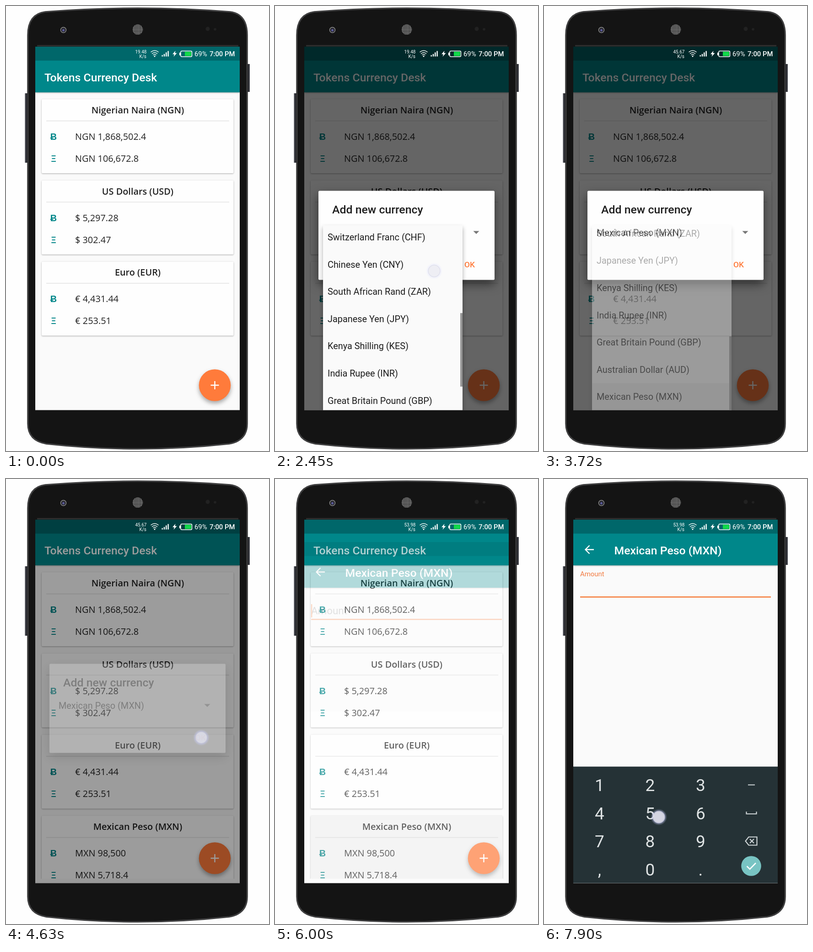
Recreate the animation shown at these times as an HTML page. Size 575x974 px, loop 8 s.

```html
<!DOCTYPE html>
<html lang="en">
<head>
<meta charset="utf-8">
<title>Currency app</title>
<style>
  html, body { margin: 0; width: 100%; height: 100%; overflow: hidden; background: #fefefe; }
  svg { display: block; width: 100vw; height: 100vh; font-family: Roboto, sans-serif; }
  .card { font: 19.87px "Open Sans", sans-serif; fill: #212121; }
  .head { font-weight: 600; text-anchor: middle; }
  .coin { font-weight: 600; text-anchor: middle; fill: #00878a; }
  .title { font-size: 24.8px; font-weight: 500; }
  .body { font-size: 19.87px; fill: #1c1c1c; }
  .key { font-size: 37px; fill: #dfe3e4; text-anchor: middle; }
  .low { filter: drop-shadow(0 1.5px 1.5px #0005); }
  .mid { filter: drop-shadow(0 5px 5px #0005); }
  .high { filter: drop-shadow(0 9px 11px #0008); }
</style>
</head>
<body>
<svg viewBox="0 0 575 974" preserveAspectRatio="none">
  <defs>
    <clipPath id="screen"><rect x="64" y="89" width="447" height="795.5"/></clipPath>
    <clipPath id="listArea"><rect x="64" y="189" width="447" height="686"/></clipPath>
    <clipPath id="lastCard"><rect x="78" y="737" width="419.5" height="138" rx="2"/></clipPath>
    <clipPath id="fabArea"><circle cx="456.5" cy="830" r="34.8"/></clipPath>
    <clipPath id="menuArea"><rect x="105" y="480" width="305" height="405"/></clipPath>
    <pattern id="mesh" width="3.4" height="3.4" patternUnits="userSpaceOnUse">
      <rect width="3.4" height="3.4" fill="#777"/><circle cx="1.7" cy="1.7" r="1.1" fill="#1a1a1a"/>
    </pattern>
    <radialGradient id="glow">
      <stop offset=".6" stop-color="#ccd0ff" stop-opacity=".75"/>
      <stop offset="1" stop-color="#ccd0ff" stop-opacity="0"/>
    </radialGradient>
    <path id="shell" d="M48 64Q48 18 86 13Q288 -3 490 13Q527 18 527 64V914Q527 951 488 958Q288 980 88 958Q48 951 48 914Z"/>
  </defs>

  <!-- phone -->
  <path fill="#3b3d43" d="M41.5 191h6v152h-6zM527 127h6v61h-6z"/>
  <path fill="#202126" d="M45 191h2v152h-2zM528 127h2v61h-2z"/>
  <use href="#shell" fill="#141414" stroke="#222" stroke-width="3.5"/>
  <use href="#shell" fill="none" stroke="#505052" stroke-width="1.4"/>
  <path d="M68 87H508" stroke="#303030" stroke-width="3"/>
  <circle cx="125.5" cy="52.5" r="6" fill="#26262c" stroke="#8b8b8b" stroke-width="1.5"/>
  <circle cx="125.5" cy="53" r="2.6" fill="#5a5a98"/>
  <circle cx="288" cy="51.5" r="11.3" fill="url(#mesh)"/>
  <circle cx="441" cy="50" r="4.5" fill="#222"/>
  <circle cx="457" cy="51" r="2.8" fill="#222"/>

  <g clip-path="url(#screen)">
    <!-- rates -->
    <rect x="64" y="89" width="447" height="796" fill="#fafafa"/>
    <g id="cards" class="card" clip-path="url(#listArea)"></g>
    <g clip-path="url(#lastCard)"><circle id="cardInk" cx="270" cy="810"/></g>
    <g class="low">
      <rect x="64" y="119" width="447" height="70" fill="#00878a"/>
    </g>
    <rect x="64" y="89" width="447" height="30.5" fill="#00676a"/>
    <text class="title" x="84" y="164.5" fill="#fff">Tokens Currency Desk</text>
    <circle class="mid" cx="456.5" cy="830" r="34.8" fill="#ff7b3b"/>
    <g clip-path="url(#fabArea)"><circle id="fabInk" cx="456.5" cy="830" fill="#fff"/></g>
    <path d="M447.5 830h18M456.5 821v18" stroke="#fff" stroke-width="2.4"/>

    <!-- amount page -->
    <g id="page">
      <rect x="64" y="89" width="447" height="900" fill="#fafafa"/>
      <rect class="low" x="64" y="119" width="447" height="70" fill="#00878a"/>
      <rect x="64" y="89" width="447" height="30.5" fill="#00676a"/>
      <path d="M109 154.5H91M99.5 145.5L90.5 154.5L99.5 163.5" fill="none" stroke="#fff" stroke-width="2.4"/>
      <text class="title" x="153.5" y="164.5" fill="#fff">Mexican Peso (MXN)</text>
      <text id="hint" x="79">Amount</text>
      <rect x="79" y="257" width="417" height="2.5" fill="#f57c3a"/>
      <rect id="caret" x="79" y="225" width="2.2" height="29" fill="#f57c3a"/>
    </g>
    <g id="pad">
      <rect x="64" y="629.5" width="447" height="256" fill="#253236"/>
      <g id="keys" class="key"></g>
      <g fill="none" stroke="#cfd5d7" stroke-width="2.2">
        <path d="M446 669.5h15M442.5 728v5h22v-5"/>
        <path d="M447.5 783.5H465.5V801.5H447.5L440.5 792.5ZM450 788l9 9M459 788l-9 9"/>
      </g>
      <circle cx="453" cy="847" r="21.8" fill="#78c4c3"/>
      <path d="M443.5 847.5L450 854L463 840.5" fill="none" stroke="#fff" stroke-width="2.6"/>
    </g>

    <!-- dialog -->
    <rect id="dim" x="64" y="89" width="447" height="796"/>
    <g id="dialog">
      <rect class="high" x="95" y="404.5" width="385" height="195" rx="2.5" fill="#fefefe"/>
      <text class="title" x="125" y="453.5" fill="#1e1e1e">Add new currency</text>
      <text id="choice" class="body" x="115" y="502.5"></text>
      <path d="M433.5 492.5h13l-6.5 6.5z" fill="#777"/>
      <text x="414" y="571.5" font-size="17.4" font-weight="500" fill="#ff7b3b">OK</text>
    </g>
    <g id="menu">
      <rect class="mid" x="105" y="480" width="305" height="420" fill="#fafafa"/>
      <g clip-path="url(#menuArea)">
        <rect id="pressed" x="105" y="825.5" width="305" height="60" fill-opacity=".05"/>
        <g id="items" class="body"></g>
        <rect id="thumb" x="405" width="5" height="161" fill="#979797"/>
      </g>
    </g>

    <!-- status bar -->
    <g fill="#fff">
      <g font-size="10" text-anchor="end">
        <text id="speed" x="307.5" y="103.5"></text><text x="307" y="113.5">K/s</text>
      </g>
      <g fill="none" stroke="#fff" stroke-width="1.5">
        <path d="M316.5 101Q325 94 333.5 101M319 104.5Q325 99.5 331 104.5M321.5 107.5Q325 104.5 328.5 107.5"/>
        <rect x="382" y="98.5" width="24.5" height="12.5" rx="2.5"/>
      </g>
      <circle cx="325" cy="110" r="1.6"/>
      <path d="M340.5 107.500h2.400v3h-2.400zM344.800 105h2.400v5.500h-2.400zM349.100 101.500h2.400v9h-2.400zM353.400 98.500h2.400v12h-2.400z"/>
      <path d="M370.500 98L364 105.500H368L366.500 111L373.500 103H369.500Z"/>
      <rect x="379" y="102" width="2.500" height="6"/>
      <rect x="391" y="100" width="14" height="9.500" fill="#12d84a"/>
      <text x="412" y="110" font-size="14.9">69%</text>
      <text x="445" y="110" font-size="14.9" font-weight="500">7:00 PM</text>
    </g>

    <g id="touch">
      <circle r="18" fill="url(#glow)"/>
      <circle r="12.8" fill="#e4e4e8" fill-opacity=".75" stroke="#c3c4dc" stroke-width="1.3"/>
    </g>
  </g>
</svg>
<script>
const $ = id => document.getElementById(id);
const ROW = 59.6, LOOP = 8000;

const rates = [
  ['Nigerian Naira (NGN)', 'NGN 1,868,502.4', 'NGN 106,672.8'],
  ['US Dollars (USD)', '$ 5,297.28', '$ 302.47'],
  ['Euro (EUR)', '€ 4,431.44', '€ 253.51'],
  ['Mexican Peso (MXN)', 'MXN 98,500', 'MXN 5,718.4']
];
const currencies = ['Ghana New Cedi (GHS)', 'Canadian Dollar (CAD)', 'Brazil Real (BRL)',
  'Russian Ruble (RUB)', 'Swedish Krona (SEK)', 'Norway Krone (NOK)', 'Korean Won (KRW)',
  'Israel Shekel (ILS)', 'Switzerland Franc (CHF)', 'Chinese Yen (CNY)', 'South African Rand (ZAR)',
  'Japanese Yen (JPY)', 'Kenya Shilling (KES)', 'India Rupee (INR)', 'Great Britain Pound (GBP)',
  'Australian Dollar (AUD)', 'Mexican Peso (MXN)'];

const text = (x, y, s, cls = '') => `<text x="${x}" y="${y}" class="${cls}">${s}</text>`;

$('cards').innerHTML = rates.map(([name, btc, eth], i) => `<g transform="translate(0 ${i * 177.7})">
  <rect class="low" x="78" y="204" width="419.5" height="162" rx="2" fill="#fefefe"/>
  <rect x="88" y="250.5" width="400" height="2" fill="#e9e9e9"/>
  ${text(288, 235, name, 'head')}${text(104, 293, 'Ƀ', 'coin')}${text(151, 293, btc)}
  ${text(104, 341, 'Ξ', 'coin')}${text(151, 341, eth)}</g>`).join('');
$('items').innerHTML = currencies.map((c, i) => text(115, 516.8 + i * ROW, c)).join('');
$('keys').innerHTML = [...'123456789,0.'].map((c, i) =>
  text(121.5 + i % 3 * 110.5, 683 + Math.floor(i / 3) * 61.7, c)).join('');

// Linear track through time, value pairs
function track(t, ...p) {
  if (t <= p[0]) return p[1];
  for (let i = 2; i < p.length; i += 2)
    if (t < p[i]) return p[i - 1] + (p[i + 1] - p[i - 1]) * (t - p[i - 2]) / (p[i] - p[i - 2]);
  return p[p.length - 1];
}
const set = (id, name, value) => $(id).setAttribute(name, value);
const fade = (id, value) => set(id, 'opacity', value);

// start, end, x, y, finger follows the list
const touches = [
  [90, 450, 456, 830], [1360, 1630, 330, 497], [1800, 2140, 352, 800, 1],
  [2200, 2500, 348, 1060.6, 1], [2800, 3050, 345, 1300, 1], [3200, 3500, 300, 856],
  [4360, 4720, 427, 566], [5270, 5600, 270, 810], [7810, 8200, 251, 740]
];

function draw(t) {
  const scroll = track(t, 1820, 0, 1910, 80, 2000, 210, 2090, 300, 2180, 300, 2270, 330, 2360, 400,
    2450, 480.6, 2540, 535, 2630, 560, 2720, 560, 2990, 608);
  const menu = track(t, 1500, 0, 1720, 1, 3540, 1, 3630, .7, 3720, .37, 3810, .12, 3900, 0);

  $('cards').lastElementChild.style.display = t >= 4540 ? '' : 'none';
  $('speed').textContent = t < 2630 ? '19.48' : t < 5630 ? '45.67' : '53.98';
  $('choice').textContent = currencies[t < 3540 ? 0 : 16];

  fade('dim', track(t, 450, 0, 810, .6, 4540, .6, 4630, .39, 4810, 0));
  fade('dialog', track(t, 450, 0, 720, 1, 4450, 1, 4540, .65, 4630, .23, 4720, 0));
  fade('menu', menu);
  set('items', 'transform', `translate(0 ${-scroll})`);
  set('thumb', 'y', 480 + scroll / (currencies.length * ROW) * 405);
  fade('thumb', track(t, 1800, 0, 1820, 1));
  fade('pressed', t >= 3270 ? 1 : 0);

  set('fabInk', 'r', track(t, 90, 0, 450, 36));
  fade('fabInk', track(t, 90, .25, 700, .25, 1180, 0));
  set('cardInk', 'r', track(t, 5270, 0, 5810, 240));
  fade('cardInk', .055);

  // page slides up while fading in
  set('page', 'transform', `translate(0 ${track(t, 5910, 64, 6000, 49, 6090, 49, 6180, 13, 6270, 4, 6360, 0)})`);
  fade('page', track(t, 5910, 0, 6000, .3, 6090, .3, 6180, .8, 6270, 1));
  const float = track(t, 6180, 0, 6450, 1);
  set('hint', 'font-size', 22.35 - 7.45 * float);
  set('hint', 'y', 247 - 34.5 * float);
  set('hint', 'fill', float ? '#f27b40' : '#a0a0a0');
  fade('caret', t < 6900 ? 1 : 0);
  const rest = 1 - track(t, 6540, 0, 7180, 1);
  set('pad', 'transform', `translate(0 ${256 * rest ** 3})`);

  const hit = touches.find(([a, b]) => t >= a && t < b);
  if (hit) {
    const [a, b, x, y, drag] = hit;
    set('touch', 'transform', `translate(${x} ${drag ? y - scroll : y})`);
    fade('touch', Math.min(1, .5 + (t - a) / 180, (b - t) / 100));
  } else fade('touch', 0);
}

const start = performance.now();
function tick(now) {
  const t = Math.max(0, now - start) % LOOP;
  const step = Math.floor((t + 9) * 11 / 1000);
  draw(Math.floor(step * 100 / 11) * 10);
  requestAnimationFrame(tick);
}
draw(0);
requestAnimationFrame(tick);
</script>
</body>
</html>
```
